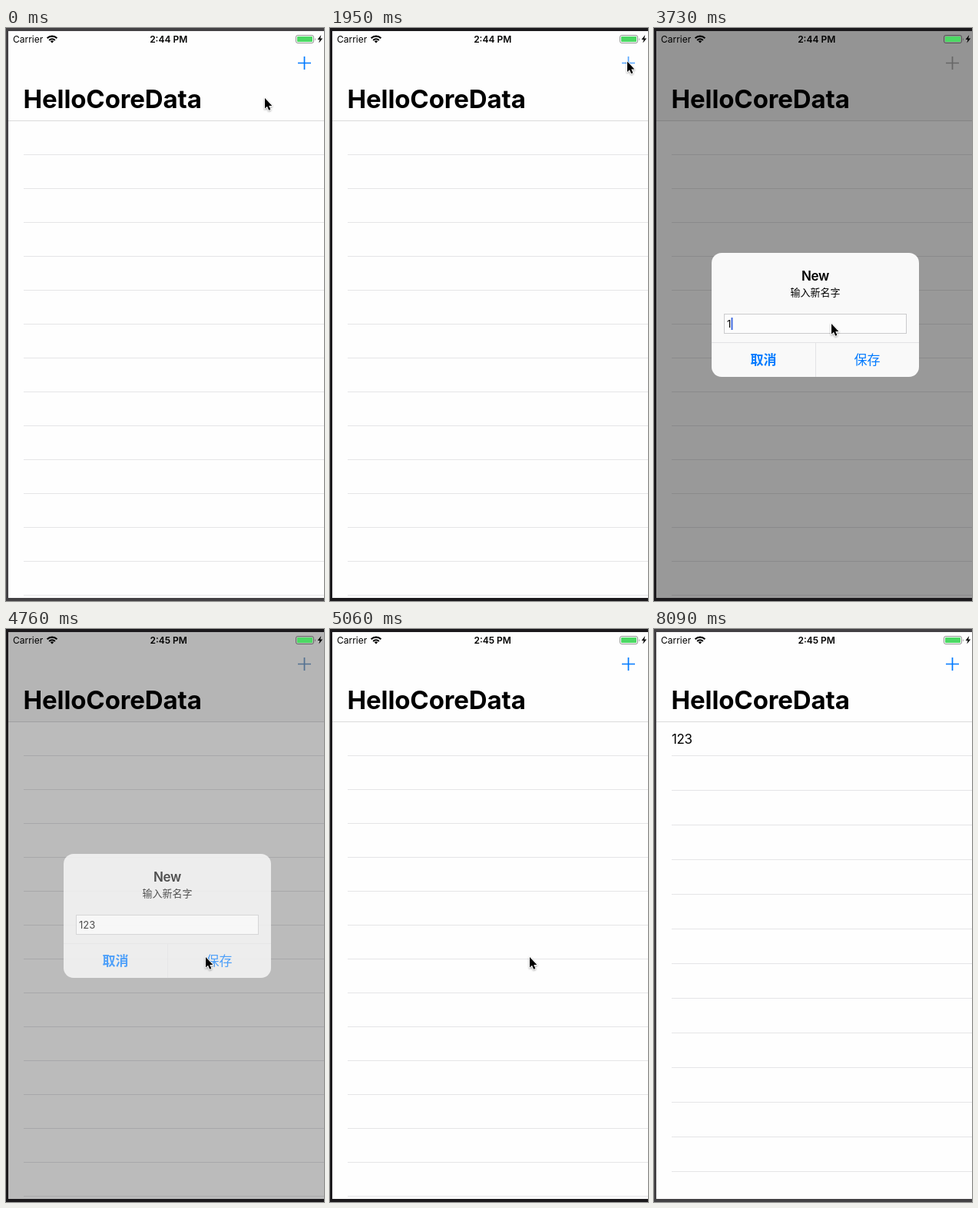
Animation of 414x744 px, one loop 8.19 s. Source, as an HTML page:

```html
<!DOCTYPE html>
<html lang="en">
<head>
<meta charset="utf-8">
<title>List app demo</title>
<style>
  html, body { margin: 0; width: 100%; height: 100%; overflow: hidden; background: #1b191c; }
  svg { display: block; width: 414px; height: 744px; }
  text { font-family: Inter, "Noto Sans CJK SC", "Noto Sans CJK", sans-serif; fill: #000; white-space: pre; }
  .title { font-size: 33px; font-weight: 700; letter-spacing: -.12px; }
  .status { font-size: 12px; }
  .bold { font-weight: 600; }
  .body { font-size: 17px; letter-spacing: -.4px; }
  .small { font-size: 13px; }
  .mid { text-anchor: middle; }
  .cjk { font-family: "Noto Sans CJK SC", "Noto Sans CJK", sans-serif; }
  .button { font-size: 17px; fill: #007aff; }
</style>
</head>
<body>
<svg viewBox="0 0 414 744">
  <rect id="frame" width="414" height="744"/>
  <rect x="3" y="4" width="411" height="736" fill="#fefefe"/>
  <rect id="nav" x="3" y="4" width="411" height="116"/>
  <rect x="3" y="120" width="411" height="1" fill="#dadadb"/>
  <text class="title" x="22.5" y="104">HelloCoreData</text>
  <path id="plus" d="M380 45.5h17M388.5 37v17" stroke-width="1.7"/>
  <g id="lines" fill="#e5e5e7"></g>
  <text id="row" class="body" x="23" y="149">123</text>
  <rect id="dim" x="3" y="4" width="411" height="736"/>

  <text class="status" x="9" y="19">Carrier</text>
  <g fill="none" stroke="#000" stroke-width="2.1">
    <path d="M53.6 13.2a9.2 9.2 0 0 1 12.8 0M56.2 15.9a5.5 5.5 0 0 1 7.6 0"/>
    <path d="M60 19.6l-2.2-2.3a3.2 3.2 0 0 1 4.4 0z" fill="#000" stroke="none"/>
  </g>
  <text id="clock" class="status bold mid" x="211.7" y="19"></text>
  <rect x="377.5" y="9.5" width="23" height="10" rx="2.3" fill="none" stroke="#000" stroke-opacity=".42"/>
  <rect x="379" y="11" width="20" height="7" rx="1" fill="#4cd964"/>
  <path d="M402 12.5q1.6 2 0 4z" fill-opacity=".42"/>
  <path d="M410.3 9L405.6 15h2.9l-1.2 4.6 4.9-6.2h-3z"/>

  <g id="alert">
    <rect id="panel" x="75" y="292" width="270" height="161" rx="13" fill="#f9f9f9"/>
    <g id="content">
      <text class="body bold mid" x="210" y="328">New</text>
      <text class="small cjk mid" x="210" y="348">输入新名字</text>
      <rect x="91.5" y="371.5" width="237" height="25" fill="#fcfcfc" stroke="#cbcbcd"/>
      <text id="typed" class="small" x="95" y="388.5"></text>
      <rect id="caret" y="376" width="2" height="16" fill="#416be0"/>
      <path d="M75 408.5h270M210.5 408v45" stroke="#e3e3e5"/>
      <text class="button cjk mid" x="142.5" y="437" font-weight="700">取消</text>
      <text class="button cjk mid" x="277.5" y="437">保存</text>
    </g>
  </g>
  <path id="cursor" d="M0 0V13.6L3 10.8 5.2 15.8 7.4 14.8 5.3 10H9.4Z"
    stroke="#fff" stroke-width="1.8" paint-order="stroke" stroke-linejoin="round"
    style="filter:drop-shadow(0 1px 1px rgba(0,0,0,.35))"/>
</svg>
<script>
const LOOP = 8190;
const TICK = 148.6; // the picture advances in ticks of this many ms
const el = {};
for (const node of document.querySelectorAll('[id]')) el[node.id] = node;

const clamp = (v, max = 1) => Math.min(max, Math.max(0, v));
const ease = p => p < .5 ? 8 * p ** 4 : 1 - 8 * (1 - p) ** 4;
const set = (name, attr, value) => el[name].setAttribute(attr, value);

// Cursor moves in ticks: to the plus, the field, the save button, then away.
const home = [337, 91];
const moves = [
  { from: 6, to: 8, end: [387, 43.5] },
  { from: 13, to: 18, end: [248, 359] },
  { from: 19, to: 22, end: [231, 384] },
  { from: 27, to: 30, end: [260, 426] },
  { from: 42, to: 43, end: [252, 408] },
  { from: 43, to: 49, end: [193, 147] }
];

function cursorAt(n) {
  return moves.reduce((pos, { from, to, end }) => {
    const p = ease(clamp((n - from) / (to - from)));
    return pos.map((v, i) => v + (end[i] - v) * p);
  }, home);
}

function drawLines(pitch) {
  if (el.lines.dataset.pitch === String(pitch)) return;
  el.lines.dataset.pitch = pitch;
  let rects = '';
  for (let y = 164; y < 740; y += pitch) rects += `<rect x="23" y="${y}" width="391" height="1"/>`;
  el.lines.innerHTML = rects;
}

function drawAlert(n, open, close) {
  const alpha = open ? 1 - close : 0;
  const count = clamp(n - 24, 3);
  set('panel', 'opacity', Math.sqrt(alpha));
  set('content', 'opacity', alpha);
  set('alert', 'transform', `translate(210 372.5) scale(${1 + .2 * (1 - open)}) translate(-210 -372.5)`);
  el.typed.textContent = '123'.slice(0, count);
  set('caret', 'x', count ? 92.5 + 8 * count : 95);
  set('caret', 'opacity', close ? 0 : 1);
}

function draw(t) {
  const n = Math.floor(t / TICK);
  const open = clamp((n - 13) * .93);
  const close = clamp((n - 31) / 3);
  const shade = open * (1 - close);
  const pressed = n >= 11 && n <= 13;
  const inserted = n >= 36;
  const ended = t >= 8090;

  set('frame', 'fill', t < 450 || ended ? '#434144' : '#1b191c');
  set('nav', 'fill', shade ? '#f6f6f6' : '#fefefe');
  set('dim', 'opacity', .4 * shade);
  el.plus.style.stroke = `color-mix(in srgb, #aaa ${100 * shade}%, #007aff)`;
  set('plus', 'opacity', pressed ? .2 + .23 * (n - 11) : 1);
  el.clock.textContent = n >= 31 ? '2:45 PM' : '2:44 PM';

  drawLines(inserted ? 45 : 44);
  set('row', 'opacity', clamp((n - 35) * .6));
  drawAlert(n, open, close);

  set('cursor', 'visibility', ended ? 'hidden' : 'visible');
  set('cursor', 'transform', `translate(${cursorAt(n)})`);
}

const begin = performance.now();
function tick() {
  draw((performance.now() - begin) % LOOP);
  requestAnimationFrame(tick);
}
tick();
</script>
</body>
</html>
```
